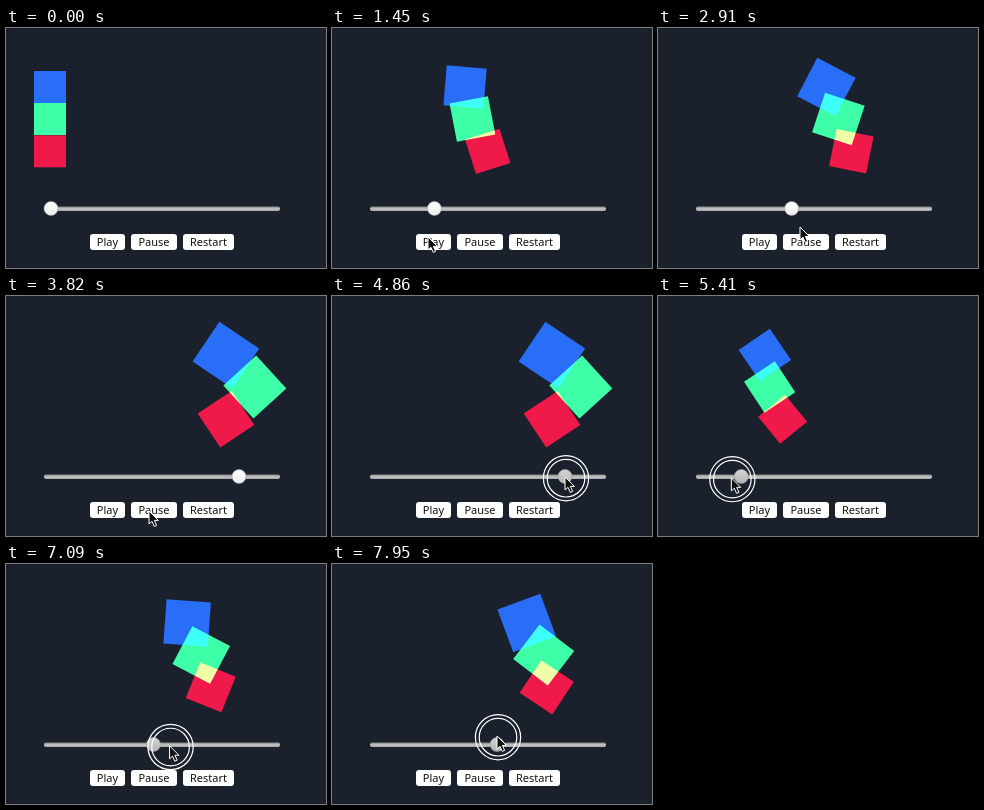
Recreate the animation shown at these times as an HTML page. Size 320 by 240 pixels, loop 8 s.

```html
<!DOCTYPE html>
<html lang="en">
<head>
<meta charset="utf-8">
<title>Playback controls</title>
<style>
  html, body { margin: 0; width: 100%; height: 100%; overflow: hidden; background: #1a212c; }
  svg { display: block; width: 100%; height: 100%; }
  text { font: 11px "Noto Sans", "Open Sans", sans-serif; text-anchor: middle; fill: #111; }
  #squares { isolation: isolate; }
  #squares rect { mix-blend-mode: lighten; }
</style>
</head>
<body>
<svg viewBox="0 0 320 240">
  <defs>
    <linearGradient id="groove" x2="0" y2="1">
      <stop offset="0" stop-color="#858585"/>
      <stop offset=".5" stop-color="#c4c4c4"/>
      <stop offset="1" stop-color="#a8a8a8"/>
    </linearGradient>
    <linearGradient id="idle" x2="0" y2="1">
      <stop offset="0" stop-color="#fff"/>
      <stop offset="1" stop-color="#ececec"/>
    </linearGradient>
    <linearGradient id="active" x2="0" y2="1">
      <stop offset="0" stop-color="#d4d4d4"/>
      <stop offset="1" stop-color="#b4b4b4"/>
    </linearGradient>
  </defs>
  <g id="squares"></g>
  <rect x="38" y="178.5" width="236" height="4.5" rx="2" fill="url(#groove)"/>
  <circle id="knob" cy="180.5" r="7" stroke="#999" stroke-width=".6"/>
  <g id="buttons"></g>
  <g id="pointer">
    <g id="ring" fill="none" stroke="#fff" stroke-width="1.2">
      <circle cx="1" cy="1.2" r="22.6"/>
      <circle cx="1" cy="1.2" r="18.8"/>
    </g>
    <path d="M0 0V13L3 10.3L5.2 15.4L7.6 14.4L5.4 9.4H9.4Z" fill="#111" stroke="#fff" stroke-width="1"/>
  </g>
</svg>
<script>
const LOOP = 8000;
const PLAY_AT = 1120, PAUSE_AT = 3484, RUN = 1280;
const DRAG_AT = 4880, DRAG_LAG = 40;
const KNOB_MIN = 45, KNOB_RANGE = 222;
const SIZE = 32, START_X = 44;

// Each property has its own end value and speed relative to the slider.
const squares = [
  { y: 59, fill: '#286ef7', move: [176, 1.149], turn: [-326, 1.237], grow: [16, 1.15] },
  { y: 91, fill: '#3effa8', move: [208, 1.035], turn: [137.5, 1.348], grow: [12.6, 1.3] },
  { y: 123.3, fill: '#ef194a', move: [176, 1.53], turn: [147, 1.11], grow: [9, 1] }
];

// Pointer stops: time, x, y
const path = [
  [250, 150, 246], [850, 96, 209], [2560, 96, 209], [2910, 142, 199],
  [3390, 143, 215], [4200, 143, 215], [4760, 233, 181], [DRAG_AT, 233, 181],
  [5510, 62, 182], [5640, 62, 183], [6300, 232, 192], [6440, 234, 190],
  [6920, 119, 184], [7340, 242, 178], [7920, 165, 172], [LOOP, 165, 172]
];
const presses = [[1010, 1140], [3400, 3500], [DRAG_AT - 60, LOOP]];

const byId = id => document.getElementById(id);

function add(parent, tag, attributes) {
  const node = document.createElementNS('http://www.w3.org/2000/svg', tag);
  set(node, attributes);
  return parent.appendChild(node);
}

function set(node, attributes) {
  for (const name in attributes) node.setAttribute(name, attributes[name]);
}

for (const [label, x, width] of [['Play', 84, 35], ['Pause', 125, 46], ['Restart', 177, 51]]) {
  add(byId('buttons'), 'rect', { x, y: 206, width, height: 16, rx: 3, fill: '#fff' });
  add(byId('buttons'), 'text', { x: x + width / 2, y: 218 }).textContent = label;
}
for (const square of squares) square.node = add(byId('squares'), 'rect', { fill: square.fill });

const smooth = u => u * u * (3 - 2 * u);

function pointerAt(t) {
  const next = path.findIndex(stop => stop[0] > t);
  if (next < 1) return path[next < 0 ? path.length - 1 : 0].slice(1);
  const [t0, x0, y0] = path[next - 1], [t1, x1, y1] = path[next];
  const u = smooth((t - t0) / (t1 - t0));
  return [x0 + (x1 - x0) * u, y0 + (y1 - y0) * u];
}

function progressAt(t) {
  if (t < PLAY_AT) return 0;
  if (t < DRAG_AT + DRAG_LAG) return (Math.min(t, PAUSE_AT) - PLAY_AT) / RUN % 1;
  return (pointerAt(t - DRAG_LAG)[0] - KNOB_MIN) / KNOB_RANGE;
}

// Quadratic ease-out
function tween([end, speed], progress) {
  const rest = 1 - Math.min(1, progress * speed);
  return end * (1 - rest * rest);
}

function draw(t) {
  const progress = progressAt(t);
  for (const { node, y, move, turn, grow } of squares) {
    const size = SIZE + tween(grow, progress);
    set(node, {
      x: -size / 2, y: -size / 2, width: size, height: size,
      transform: `translate(${START_X + tween(move, progress)} ${y}) rotate(${tween(turn, progress)})`
    });
  }
  set(byId('knob'), {
    cx: KNOB_MIN + KNOB_RANGE * progress,
    fill: t >= DRAG_AT - 60 ? 'url(#active)' : 'url(#idle)'
  });
  const pressed = presses.some(([from, to]) => t >= from && t < to);
  set(byId('ring'), { visibility: pressed ? 'visible' : 'hidden' });
  set(byId('pointer'), { transform: `translate(${pointerAt(t)})` });
}

const began = performance.now();
function tick() {
  draw((performance.now() - began) % LOOP);
  requestAnimationFrame(tick);
}
tick();
</script>
</body>
</html>
```
